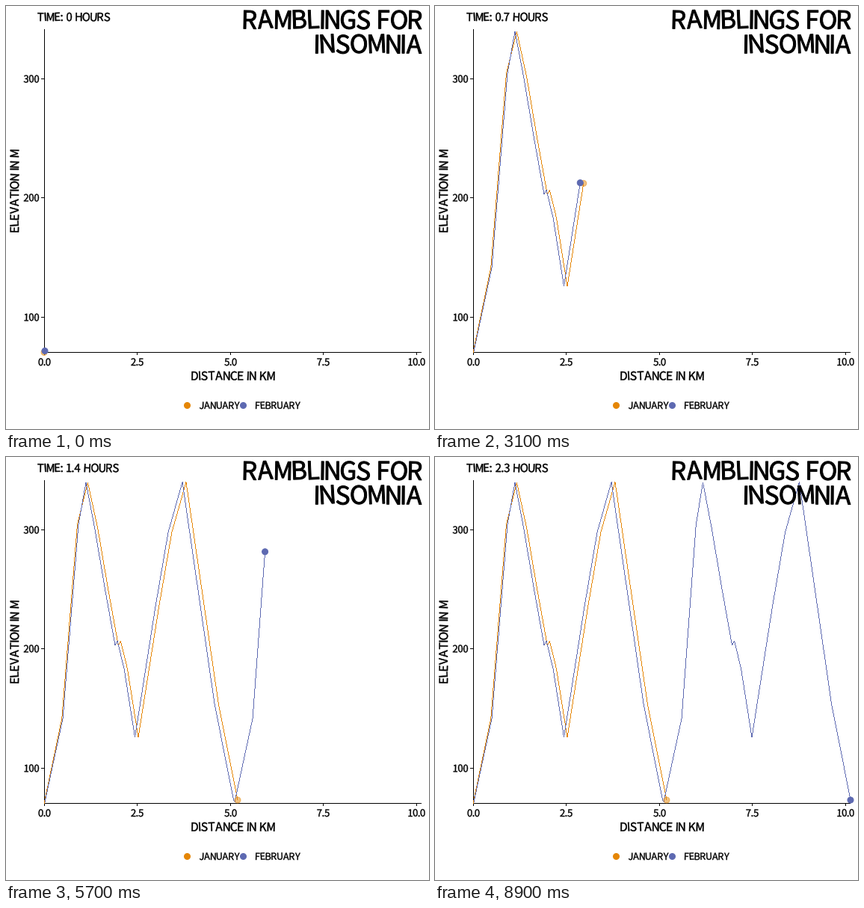
A matplotlib script that plays this animation: 566x566 px, repeating every 10 s.

```python
import matplotlib.pyplot as plt
import numpy as np
from matplotlib.animation import FuncAnimation
from matplotlib.patches import Circle, PathPatch
from matplotlib.path import Path
from matplotlib.textpath import TextPath
from matplotlib.transforms import Affine2D

SIZE, DPI = 566, 100
PX = 72 / DPI
FRAMES, INTERVAL = 100, 100
START, STEPS, HOURS = 5, 84, 2.29
ORANGE, BLUE = "#E58606", "#5D69B1"
FONT = {"family": "Noto Sans CJK JP"}
GAP, SPACE, TILT = 0.11, 0.38, 3.5  # in cap heights, and degrees

plt.rcParams["path.simplify"] = False
fig = plt.figure(figsize=(SIZE / DPI, SIZE / DPI), dpi=DPI, facecolor="white")
ax = fig.add_axes([0, 0, 1, 1])
ax.set(xlim=(0, SIZE), ylim=(SIZE, 0))
ax.axis("off")

cap_height = TextPath((0, 0), "H", size=100, prop=FONT).get_extents().height
outlines = {}


def letter(char):
    """Outline of one letter with cap height 1."""
    if char not in outlines:
        path = TextPath((0, 0), char, size=100, prop=FONT)
        outlines[char] = path.transformed(Affine2D().scale(1 / cap_height))
    return outlines[char]


def lettering(text, x, y, size, align=0, angle=0):
    """Slightly unsteady letters; align 0 = left, 0.5 = centre, 1 = right."""
    rng = np.random.default_rng(8)
    pen, paths = 0, []
    for char in text:
        if char == " ":
            pen += SPACE
            continue
        tilted = letter(char).transformed(Affine2D().rotate_deg(rng.uniform(-TILT, TILT)))
        box = tilted.get_extents()
        paths.append(tilted.transformed(Affine2D().translate(pen - box.x0, 0)))
        pen += box.width + GAP
    place = Affine2D().translate(-align * (pen - GAP), 0).scale(size, -size)
    place.rotate_deg(angle).translate(x, y)
    return Path.make_compound_path(*paths).transformed(place)


def write(text, x, y, size, **layout):
    return ax.add_patch(PathPatch(lettering(text, x, y, size, **layout), color="black",
                                  lw=0.04 * size * PX, joinstyle="round", zorder=6))


def stroke(xs, ys, color="black", zorder=1):
    return ax.plot(xs, ys, color=color, lw=PX, solid_capstyle="butt", snap=False,
                   zorder=zorder)[0]


def dot(x, y, color, alpha=1, zorder=4):
    shade = (color, alpha)
    return ax.add_patch(Circle((x, y), 4, facecolor=shade, edgecolor=shade, lw=PX, zorder=zorder))


# Axes
stroke([51.5, 51.5], [31, 464])
stroke([51, 556], [463.5, 463.5])
for km in np.arange(0, 10.1, 2.5):
    x = np.floor(51.3 + 49.8 * km) + 0.5
    stroke([x, x], [464, 467])
    write(f"{km:.1f}", x, 481, 9.6, align=0.5)
for metres in (100, 200, 300):
    y = np.floor(575.6 - 1.595 * metres) + 0.5
    stroke([47, 51], [y, y])
    write(str(metres), 44, y + 4.8, 9.6, align=1)
write("DISTANCE IN KM", 304, 500.5, 11.5, align=0.5)
write("ELEVATION IN M", 17, 247.5, 11.5, align=0.5, angle=-90)

# Title and legend
write("RAMBLINGS FOR", 556, 30.3, 24.5, align=1)
write("INSOMNIA", 556, 63.2, 24.5, align=1)
for x, color, month in ((242.5, ORANGE, "JANUARY"), (317.5, BLUE, "FEBRUARY")):
    dot(x, 534.5, color)
    write(month, x + 16.5, 539, 9.3)
clock = write("TIME: 0 HOURS", 42.3, 20, 11)

# One lap over two hills, in stage pixels
lap = np.array([
    (52, 461.5), (76, 350), (97, 90), (107, 34), (119, 97), (132, 174), (146, 252), (149, 246),
    (158, 283), (172.5, 375), (200, 200), (217, 101), (236, 33.5), (279, 330), (304.5, 459)])
turns = np.array([0, 3, 9, 12, 14])  # foot, summit, saddle, summit, foot


def shifted(profile, *keys):
    """Slide points sideways by amounts interpolated between (x, shift) keys."""
    moved = profile.copy()
    moved[:, 0] += np.interp(profile[:, 0], *zip(*keys))
    return moved


january = shifted(lap, (52, -1), (97, -1.5), (111, 4), (305, 5.5))
january[0] = 51, 463.5
february = np.vstack([lap, shifted(lap, (76, 254), (107, 251.5))])


class Runner:
    """Keeps a steady vertical speed between the frames at which the turns are reached."""

    def __init__(self, profile, turns, frames, color, alpha, zorder):
        self.profile = profile
        self.climb = np.append(0, np.cumsum(np.abs(np.diff(profile[:, 1]))))
        self.frames, self.goals = frames, self.climb[turns]
        self.trail = stroke([], [], color, zorder)
        self.head = dot(*profile[0], color, alpha, zorder + 2)

    def at(self, climb):
        return [np.interp(climb, self.climb, axis) for axis in self.profile.T]

    def move(self, frame):
        climb = np.interp(frame, self.frames, self.goals)
        self.head.center = self.at(climb)
        # Hard-edged trail: one unit stroke for every row passed
        xs, ys = np.floor(self.at(np.arange(0, climb)))
        gaps = np.full_like(xs, np.nan)
        self.trail.set_data(np.column_stack([xs + 0.5, xs + 0.5, gaps]).ravel(),
                            np.column_stack([ys, ys + 1, gaps]).ravel())


runners = [
    Runner(january, turns, [5, 15, 26, 38.4, 47.5], ORANGE, 0.5, zorder=2),
    Runner(february, np.append(turns, turns[1:] + len(lap)),
           [5, 20.4, 26.5, 37.6, 45, 60.3, 68, 82, 89], BLUE, 1, zorder=3),
]


def update(frame):
    step = min(max(frame - START, 0), STEPS)
    hours = round(HOURS * step / STEPS, 1)
    clock.set_path(lettering(f"TIME: {hours:g} HOURS", 42.3, 20, 11))
    for runner in runners:
        runner.move(START + step)
    return [clock]


animation = FuncAnimation(fig, update, frames=FRAMES, interval=INTERVAL,
                          init_func=lambda: update(0), repeat=True, repeat_delay=0)
plt.show()
```
